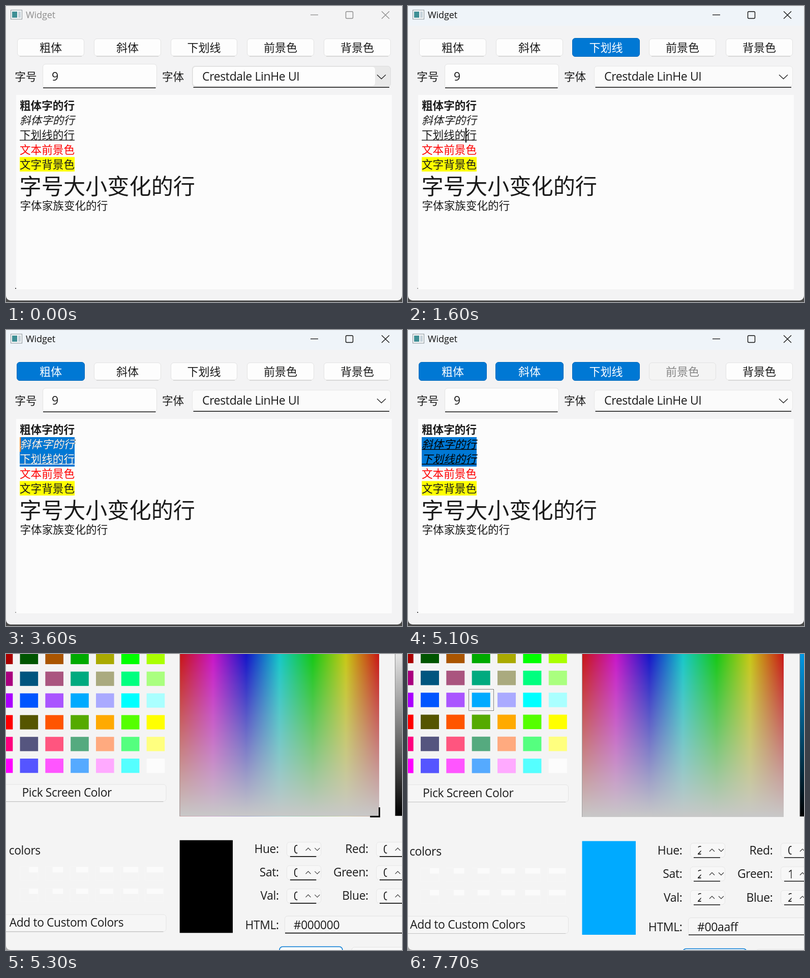
Animation, 779 px wide and 583 px high, one loop 8000 ms. Source, as an HTML page:

```html
<!DOCTYPE html>
<html lang="zh">
<head>
<meta charset="utf-8">
<title>Widget</title>
<style>
html, body { margin: 0; width: 100%; height: 100%; overflow: hidden; background: #f3f3f3; }
svg { display: block; width: 779px; height: 583px; }
text { font-family: 'Open Sans', 'Noto Sans', sans-serif; font-size: 23px; letter-spacing: -.36px; fill: #1b1b1b; white-space: pre; }
.zh { font-family: 'Noto Sans CJK SC', 'Noto Sans CJK', sans-serif; font-size: 21.6px; letter-spacing: 0; }
</style>
</head>
<body>
<svg id="stage" viewBox="0 0 779 583" xmlns="http://www.w3.org/2000/svg"></svg>
<script>
const LOOP = 8000;
const INK = '#1b1b1b', BLUE = '#0078d4';
const FONT = 'Crestdale LinHe UI';
const ZOOM_X = 265, ZOOM_Y = 200;
const stage = document.getElementById('stage');

// Each step overrides part of the state from its time on.
const steps = [
  [0, { size: '9', font: FONT, on: '', hover: '', caret: null, active: false, focus: false,
        comboHover: true, editHover: false, sel: 0, italic3: false, under2: false,
        fill: '', pressed: false, dialog: 0, alpha: 1, mark: false, picked: false,
        okHover: false, htmlHover: false }],
  [100, { comboHover: false }],
  [500, { active: true, focus: true, font: '黑体', caret: [200, 382, 22] }],
  [800, { font: FONT, size: '18', caret: [329, 328, 54] }],
  [1000, { size: '9', caret: [113, 298, 28], fill: 'back' }],
  [1100, { caret: null }],
  [1400, { fill: 'fore', caret: [113, 269, 28] }],
  [1500, { fill: '', on: 'u', caret: null }],
  [1600, { caret: [113, 240, 29] }],
  [1900, { on: 'i', caret: [114, 211, 29] }],
  [2000, { caret: null }],
  [2200, { on: 'b' }],
  [2500, { caret: [135, 182, 29] }],
  [2800, { on: 'u', caret: [135, 240, 29] }],
  [2900, { on: 'i', sel: 1, caret: null }],
  [3000, { on: 'b', sel: 2 }],
  [3400, { editHover: true }],
  [3600, { editHover: false, caret: [27, 211, 29, '#ff872b'] }],
  [3900, { focus: false, caret: null, hover: 'i' }],
  [4000, { on: 'bi', italic3: true }],
  [4200, { hover: 'u' }],
  [4500, { on: 'biu', under2: true }],
  [4600, { hover: '' }],
  [4700, { hover: 'f' }],
  [5100, { hover: '', pressed: true }],
  [5200, { dialog: .965, alpha: .75 }],
  [5300, { dialog: .9895, alpha: 1 }],
  [5400, { dialog: 1 }],
  [6100, { mark: true }],
  [6200, { picked: true }],
  [6700, { okHover: true }],
  [7500, { htmlHover: true, okHover: false }],
  [7700, { htmlHover: false }]
];

const rect = (x, y, w, h, fill, more = '') =>
  `<rect x="${x}" y="${y}" width="${w}" height="${h}" fill="${fill}" ${more}/>`;
const line = (d, color = INK, w = 1.3, more = '') =>
  `<path d="${d}" fill="none" stroke="${color}" stroke-width="${w}" ${more}/>`;
const latin = (x, y, s, more = '') => `<text x="${x}" y="${y}" ${more}>${s}</text>`;
const zh = (x, y, s, more = '') => `<text class="zh" x="${x}" y="${y}" ${more}>${s}</text>`;
const color = c => `style="fill:${c}"`;
const box = (x, y, w, h, fill = '#fcfcfc', edge = '#e3e3e3') =>
  rect(x + .5, y + .5, w - 1, h - 1, fill, `rx="5.5" stroke="${edge}"`);
const stops = list => list.map((c, i) =>
  `<stop offset="${i / (list.length - 1)}" stop-color="${c}"/>`).join('');

function button(s, key, x, w, label) {
  const mid = x + w / 2, hot = s.hover === key;
  const text = c => zh(mid, 90, label, `text-anchor="middle" style="font-size:22px;fill:${c}"`);
  if (s.on.includes(key))
    return box(x - 1, 63, w + 2, 37, hot ? '#1a86d9' : BLUE, '#0069ba') + text('#fff');
  if (key === 'g' && s.fill === 'back') return rect(621, 60, 140, 43, '#ff0') + text(INK);
  if (key === 'f' && s.fill === 'fore') return rect(470, 60, 140, 43, '#f00') + text(INK);
  if (key === 'f' && s.pressed) return box(x, 64, w, 35, '#f4f4f4', '#e2e2e2') + text('#868686');
  return box(x, 64, w, 35, hot ? '#f6f6f6' : '#fdfdfd') +
    line(`M${x + 5} 99H${x + w - 5}`, '#c6c6c6', 1.2) + text(INK);
}

function titleBar(s) {
  const c = s.active ? '#111' : '#8d8d8d';
  return (s.active ? rect(0, 0, 779, 39, '#eff4f9') : '') +
    rect(9.5, 8, 22, 18, '#f4f6f7', 'stroke="#8a949a"') + rect(12, 11, 10, 12, '#3f8f95') +
    rect(24, 11, 5, 12, '#c5d2da') +
    latin(39, 24, 'Widget', `style="font-size:18px;letter-spacing:-.1px;fill:${c}"`) +
    line('M599 17.5H614', c) + line('M739 10.5L754 25M754 10.5L739 25', c) +
    `<rect x="668.5" y="11" width="14" height="13.5" rx="2" fill="none" stroke="${c}" stroke-width="1.4"/>`;
}

function fields(s) {
  const hot = s.comboHover;
  return zh(17.3, 146.5, '字号') + zh(307, 146.5, '字体') +
    box(72, 114, 225, 48, s.editHover ? '#f6f6f6' : '#fdfdfd') + line('M73 161.3H294.5', '#111', 1.5) +
    latin(90, 147, s.size) +
    box(366, 118, 391, 41, hot ? '#e9e9e9' : '#fbfbfb', hot ? '#dcdcdc' : '#e8e8e8') +
    (hot ? rect(368, 120, 358, 37, '#fdfdfd', 'rx="5"') : '') +
    line('M368.5 160.3H754', '#111', 1.6) + line('M730 135.5L738.5 143.5L747 135.5', '#222') +
    (s.font === FONT ? latin(386, 147, FONT) : zh(386, 147, s.font));
}

function styledRow(y, str, slanted, under, c) {
  return `<g transform="translate(27 ${y})${slanted ? ' skewX(-13)' : ''}">${zh(0, 0, str, color(c))}</g>` +
    (under ? rect(27, y + 1.6, 108, 1.4, c) : '');
}

function editor(s) {
  const rows = c => styledRow(233, '斜体字的行', true, s.under2, c) +
    styledRow(262, '下划线的行', s.italic3, true, c);
  const top = s.sel === 2 ? 211 : 240;
  let out = rect(20, 175, 739, 383, '#fcfcfc') + rect(18, 555.5, 2, 1.5, s.focus ? '#888' : '#111');
  out += zh(27, 204, '粗体字的行', 'font-weight="700"');
  if (s.sel) out += rect(27, top, 108, 269 - top, BLUE);
  out += rows(s.sel && !s.focus ? '#000' : INK);
  if (s.sel && s.focus)
    out += `<clipPath id="sel">${rect(27, top, 108, 269 - top, '#000')}</clipPath>
      <g clip-path="url(#sel)">${rows('#fff')}</g>`;
  out += zh(27, 291, '文本前景色', color('#f00')) + rect(27, 297.5, 108, 28.5, '#ff0') +
    zh(27, 320, '文字背景色') + zh(26.5, 371.2, '字号大小变化的行', 'style="font-size:43.2px"') +
    zh(27.5, 401, '字体家族变化的行');
  if (s.caret) {
    const [x, y, h, c = '#000'] = s.caret;
    out += rect(x, y, 2, h, c);
  }
  return out;
}

function mainWindow(s) {
  return rect(0, 0, 779, 583, '#4a4a4a') + rect(0, -20, 779, 600, '#f3f3f4', 'rx="9"') +
    titleBar(s) +
    button(s, 'b', 22, 132, '粗体') + button(s, 'i', 173, 132, '斜体') +
    button(s, 'u', 324, 131, '下划线') + button(s, 'f', 474, 132, '前景色') +
    button(s, 'g', 625, 132, '背景色') + fields(s) + editor(s);
}

function swatches(s) {
  let out = '';
  for (let col = 1; col < 8; col++)
    for (let row = 0; row < 6; row++) {
      const r = (col % 2 * 2 + (row > 2)) * 85, g = (col >> 1) * 85, b = Math.floor(row % 3 * 127.5);
      const last = col === 7 && row === 5;
      out += rect(25 + (col - 2) * 50.35, -10.4 + row * 43.3, 36, 28.5, last ? '#fcfcfc' : `rgb(${r},${g},${b})`);
    }
  if (s.mark) out += line('M119 69.5H168.5V111.5H119.5V69', '#111', 1, 'stroke-dasharray="1 1"');
  for (let i = 0; i < 6; i++)
    for (const y of [421, 464]) {
      const x = 43 + i * 46.8, end = 61 + i * 49.8;
      out += rect(end - 36, y + .5, 36, 27, 'none', 'stroke="#f6f6f6"') + rect(x, y + 1, end - x, 10.5, '#fbfbfb');
    }
  return out;
}

function picker(s) {
  const top = s.picked ? '#00aaff' : '#fff';
  return `<defs>
    <linearGradient id="hue">${stops(['#c80000', '#c800c8', '#0000c8', '#00c8c8', '#00c800', '#c8c800', '#c80000'])}</linearGradient>
    <linearGradient id="sat" x2="0" y2="1"><stop stop-color="#c8c8c8" stop-opacity="0"/><stop offset="1" stop-color="#c8c8c8"/></linearGradient>
    <linearGradient id="val" x2="0" y2="1">${stops([top, '#000'])}</linearGradient></defs>` +
    rect(343, -39, 396, 360, 'url(#hue)') + rect(343, -39, 396, 360, 'url(#sat)') +
    line('M342.5 -39V321', '#a0a0a0', 1) +
    (s.picked ? '' : line('M739.5 303V321.5H721', '#000', 3)) +
    rect(771, -39, 40, 359, 'url(#val)') + line('M770.8 -39V320', '#8c8c8c', 1) +
    rect(342.5, 368.5, 105.5, 184.5, s.picked ? '#00aaff' : '#000');
}

function spin(x, y, label, value) {
  const id = 'clip' + label;
  return latin(x - 15.5, y + 22.5, label + ':', 'text-anchor="end"') +
    box(x, y, 69, 29, '#f7f7f7', '#e6e6e6') + line(`M${x + 7} ${y + 29}h52`, '#111', 1.6) +
    `<clipPath id="${id}">${rect(x + 8, y, 13.5, 28, '#000')}</clipPath>
    <g clip-path="url(#${id})">${latin(x + 14, y + 23, value)}</g>` +
    line(`M${x + 38} ${y + 17}l5 -5l5 5M${x + 56} ${y + 12}l5 5l5 -5`, '#333', 1.1);
}

function dialog(s) {
  const hsv = s.picked ? ['200', '255', '255'] : ['0', '0', '0'];
  const rgb = s.picked ? ['0', '170', '255'] : ['0', '0', '0'];
  const wide = (y, x, str) => box(-60, y, 376, 35, '#f6f6f6', '#e4e4e4') +
    line(`M-50 ${y + 34.5}H310`, '#c2c2c2', 1.2) + latin(x, y + 25, str);
  let out = rect(-400, -400, 1700, 1500, '#f4f4f4') + swatches(s) + picker(s) +
    wide(257, 29, 'Pick Screen Color') + wide(516, 4, 'Add to Custom Colors') + latin(3, 397, 'colors');
  ['Hue', 'Sat', 'Val'].forEach((n, i) => out += spin(555, 372 + i * 46.5, n, hsv[i]));
  ['Red', 'Green', 'Blue'].forEach((n, i) => out += spin(733, 372 + i * 46.5, n, rgb[i]));
  out += latin(539.5, 546, 'HTML:', 'text-anchor="end"') +
    box(551, 519, 270, 35, s.htmlHover ? '#fafafa' : '#f6f6f6') + line('M552 553.3H820', '#111', 1.6) +
    latin(569, 546, s.picked ? '#00aaff' : '#000000') +
    rect(541, 580.5, 125, 34, s.okHover ? '#e0eef9' : '#fbfbfb', `rx="6" stroke="${BLUE}" stroke-width="1.6"`) +
    box(684, 581, 130, 34, '#f8f8f8');
  const k = s.dialog;
  return `<g opacity="${s.alpha}" transform="translate(${ZOOM_X * (1 - k)} ${ZOOM_Y * (1 - k)}) scale(${k})">${out}</g>` +
    '<path d="M0 575Q1 582 9 583H0Z" fill="#a8a8a8"/>';
}

let shown = -1;
function draw(t) {
  const count = steps.filter(([at]) => at <= t).length;
  if (count === shown) return;
  shown = count;
  const s = Object.assign({}, ...steps.slice(0, count).map(step => step[1]));
  stage.innerHTML = (s.dialog && s.alpha === 1 ? '' : mainWindow(s)) + (s.dialog ? dialog(s) : '');
}

const start = performance.now();
function tick() {
  draw((performance.now() - start) % LOOP);
  requestAnimationFrame(tick);
}
tick();
</script>
</body>
</html>
```
